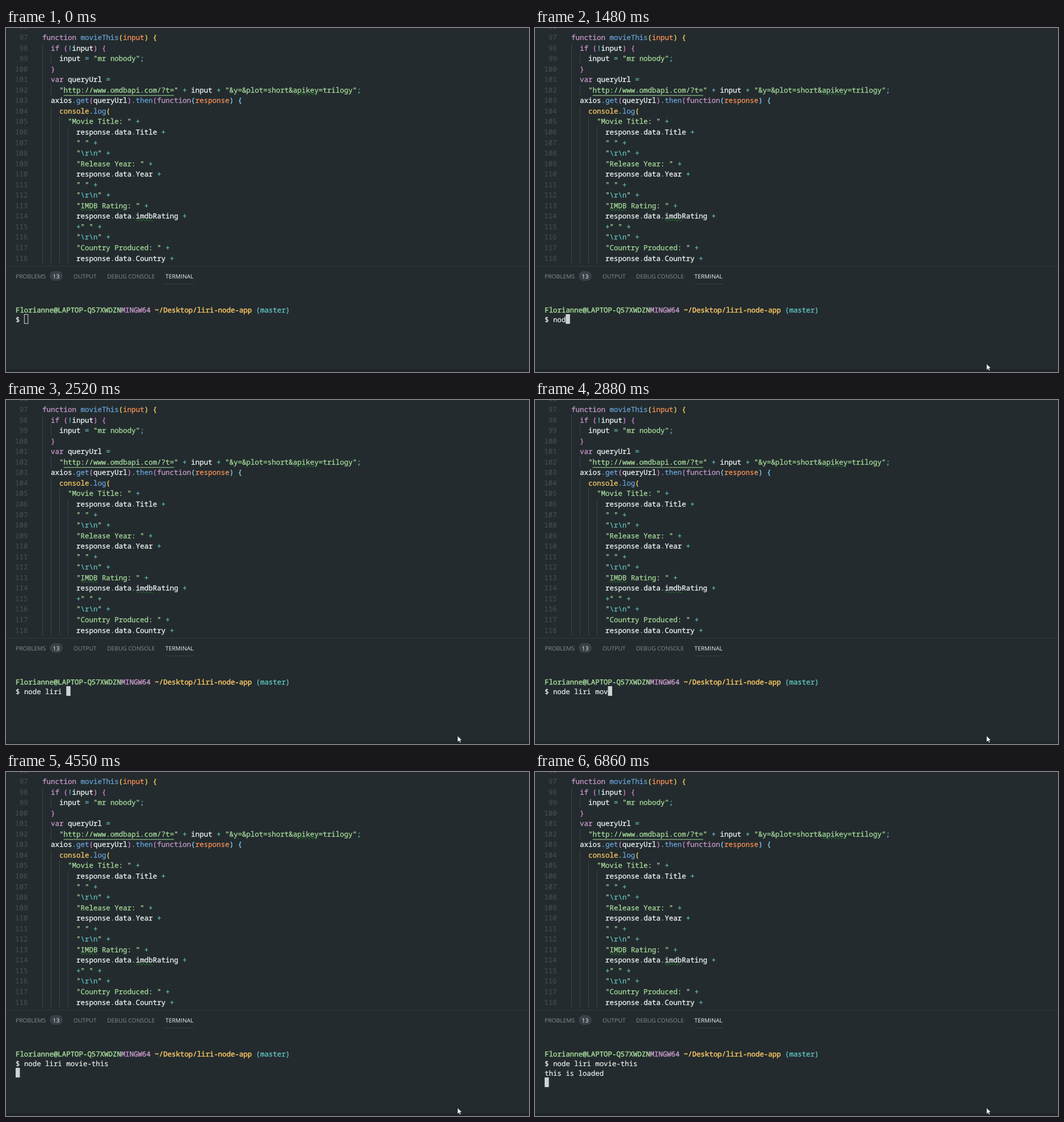
An HTML page for the animation above (8000 ms loop, 922 px wide and 607 px high).

```html
<!DOCTYPE html>
<html lang="en">
<head>
<meta charset="utf-8">
<style>
  html, body { margin: 0; width: 100%; height: 100%; overflow: hidden; background: #232b2e; }
  svg { display: block; }
  text { white-space: pre; text-rendering: geometricPrecision; }
  .code { font: 12.49px "Noto Sans Mono", "DejaVu Sans Mono", monospace; stroke-width: .3px; }
  .term { font: 12.4px "Noto Sans Mono", "DejaVu Sans Mono", monospace; stroke-width: .2px; }
  .prompt { stroke-width: .45px; }
  .tab { font: 10.3px "Open Sans", "Noto Sans", sans-serif; fill: #858c8f; }
  .active { fill: #f0f3f3; }
</style>
</head>
<body>
<svg id="stage" width="922" height="607" viewBox="0 0 922 607">
  <g id="editor"></g>
  <g id="panel">
    <rect y="420" width="922" height="1" fill="#323b3f"/>
    <text class="tab" x="17" y="442">PROBLEMS</text>
    <rect x="77" y="429" width="23" height="17" rx="8.5" fill="#384246"/>
    <text class="tab active" x="88.5" y="442" text-anchor="middle">13</text>
    <text class="tab" x="119" y="442">OUTPUT</text>
    <text class="tab" x="178" y="442">DEBUG CONSOLE</text>
    <text class="tab active" x="281" y="442">TERMINAL</text>
    <rect x="281" y="451" width="50" height="1" fill="#343e42"/>
    <rect y="602" width="922" height="5" fill="#1f2629"/>
  </g>
  <g id="terminal"></g>
  <g id="pointer">
    <circle id="click" cx="-.5" cy="-.5" r="8" fill="#ffff00" opacity=".45"/>
    <path d="M0 0V11.2L2.6 8.8L4.4 12.6L6.2 11.8L4.5 8.1H8Z" fill="#fff" stroke="#111" stroke-width=".7"/>
  </g>
</svg>
<script>
const LOOP = 8000;
const COLOR = {
  bg: '#232b2e', plain: '#f0f5f5', keyword: '#c898cb', call: '#6aa2d8', param: '#f99157',
  object: '#fac863', string: '#a5da99', operator: '#5fbcbc', number: '#4a5256', guide: '#3a4448',
};
const BRACKETS = ['#ffd75e', '#da80d6', '#87cefa'];

const CODE = String.raw`function movieThis(input) {
  if (!input) {
    input = "mr nobody";
  }
  var queryUrl =
    "http://www.omdbapi.com/?t=" + input + "&y=&plot=short&apikey=trilogy";
  axios.get(queryUrl).then(function(response) {
    console.log(
      "Movie Title: " +
        response.data.Title +
        " " +
        "\r\n" +
        "Release Year: " +
        response.data.Year +
        " " +
        "\r\n" +
        "IMDB Rating: " +
        response.data.imdbRating +
        +" " +
        "\r\n" +
        "Country Produced: " +
        response.data.Country +`.split('\n');

const byId = id => document.getElementById(id);

function add(parent, tag, attrs = {}, content = '') {
  const node = document.createElementNS('http://www.w3.org/2000/svg', tag);
  for (const key in attrs) node.setAttribute(key, attrs[key]);
  node.textContent = content;
  return parent.appendChild(node);
}

// The thin stroke gives the text its slightly heavy weight.
function addText(parent, cls, x, y, runs) {
  const text = add(parent, 'text', { class: cls, x, y });
  return runs.map(([content, color]) => add(text, 'tspan', { fill: color, stroke: color }, content));
}

// Editor
const editor = byId('editor');
const CODE_X = 64, CODE_ADVANCE = 7.494, LINE = 18.55;
const codeX = column => CODE_X + column * CODE_ADVANCE;
const codeY = row => 21 + row * LINE;

const TOKEN = /(?<string>"[^"]*")|(?<keyword>\b(?:function|var|if)\b)|(?<param>(?<=function.*\()\w+)|(?<call>\w+(?=\())|(?<object>console)|(?<bracket>[(){}])|(?<operator>[.;+=!])|(?<plain>\w+|\s+)/g;
let depth = 0;

function highlight(line) {
  return [...line.matchAll(TOKEN)].flatMap(({ 0: token, groups }) => {
    const kind = Object.keys(groups).find(name => groups[name]);
    if (kind === 'string') {
      return token.split(/(\\.)/).filter(Boolean)
        .map(part => [part, part[0] === '\\' ? COLOR.operator : COLOR.string]);
    }
    if (kind === 'bracket') {
      const level = '({'.includes(token) ? depth++ : --depth;
      return [[token, BRACKETS[level % 3]]];
    }
    return [[token, COLOR[kind]]];
  });
}

function addGuide(column, firstRow, lastRow) {
  const top = codeY(firstRow) - 13.5;
  const bottom = Math.min(420, codeY(lastRow) + 5.05);
  add(editor, 'rect', { x: Math.round(codeX(column)), y: top, width: 1, height: bottom - top, fill: COLOR.guide });
}

function addSquiggle(row, word) {
  const x = codeX(CODE[row].indexOf(word)), y = codeY(row) + 3;
  const waves = Math.round(word.length * CODE_ADVANCE / 6);
  add(editor, 'path', { d: `M${x} ${y}` + 'q1.5-3 3 0t3 0'.repeat(waves), fill: 'none', stroke: '#2a7d30', 'stroke-width': 1 });
}

[[0, 1, 21], [2, 2, 2], [2, 5, 5], [2, 7, 21], [4, 8, 21], [6, 9, 21]].forEach(guide => addGuide(...guide));

for (let row = -1; row < CODE.length; row++) {
  add(editor, 'text', { class: 'code', x: 38.5, y: codeY(row), 'text-anchor': 'end', fill: COLOR.number }, 97 + row);
  if (row < 0) continue;
  const line = CODE[row].trimStart();
  addText(editor, 'code', codeX(CODE[row].length - line.length), codeY(row), highlight(line));
}
add(editor, 'rect', { x: codeX(5), y: 118.5, width: 26 * CODE_ADVANCE, height: 1, fill: COLOR.string });
addSquiggle(5, 'apikey');
addSquiggle(16, 'IMDB');
addSquiggle(17, 'imdb');

// Terminal
const terminal = byId('terminal');
const TERM_X = 17, TERM_ADVANCE = 7.44, TERM_LINE = 17;
const COMMAND = 'node liri movie-this';
const KEYS = [ // [time, characters typed]
  [1170, 1], [1360, 2], [1480, 3], [1600, 4], [1780, 5], [1830, 6], [2080, 7], [2150, 8], [2280, 9],
  [2520, 10], [2770, 11], [2880, 13], [3270, 15], [3340, 16], [3810, 18], [4010, 19], [4190, 20],
];
const ENTER = 4550, OUTPUT = 6250, NEWLINE = 6610;
const FOCUS = 690;

const block = add(terminal, 'rect');
addText(terminal, 'term prompt', TERM_X, 501.5, [
  ['Florianne@LAPTOP-Q57XWDZN', COLOR.string],
  ['MINGW64', COLOR.keyword],
  [' ~/Desktop/liri-node-app', COLOR.object],
  [' (master)', COLOR.operator],
]);
const [, typed] = addText(terminal, 'term', TERM_X, 518.5, [['$ ', COLOR.plain], ['', COLOR.plain]]);
const [head, tail] = addText(terminal, 'term', TERM_X, 535.5, [['', COLOR.plain], ['', COLOR.plain]]);

function setBlock(column, row, focused) {
  const inset = focused ? 0 : 0.5;
  const box = {
    x: TERM_X + column * TERM_ADVANCE + inset,
    y: 505 + row * TERM_LINE + inset,
    width: TERM_ADVANCE - 2 * inset,
    height: TERM_LINE - 2 * inset,
    fill: focused ? '#cfd3d3' : 'none',
    stroke: focused ? 'none' : '#cfd3d3',
  };
  for (const key in box) block.setAttribute(key, box[key]);
}

function draw(time) {
  const count = KEYS.reduce((n, [at, length]) => time >= at ? length : n, 0);
  const row = (time >= ENTER) + (time >= NEWLINE);
  typed.textContent = COMMAND.slice(0, count);
  setBlock(row ? 0 : 2 + count, row, time >= FOCUS);

  const loaded = time >= OUTPUT;
  head.textContent = loaded ? 't' : '';
  tail.textContent = loaded ? 'his is loaded' : '';
  for (const paint of ['fill', 'stroke']) head.setAttribute(paint, row === 1 ? COLOR.bg : COLOR.plain);

  const pointer = byId('pointer');
  pointer.setAttribute('visibility', time >= 250 ? 'visible' : 'hidden');
  pointer.setAttribute('transform', time < 300 ? 'translate(801 597)' : 'translate(796 592.5)');
  byId('click').setAttribute('opacity', time >= 550 && time < 750 ? 0.45 : 0);
}

const start = performance.now();
function tick() {
  draw((performance.now() - start) % LOOP);
  requestAnimationFrame(tick);
}
tick();
</script>
</body>
</html>
```
